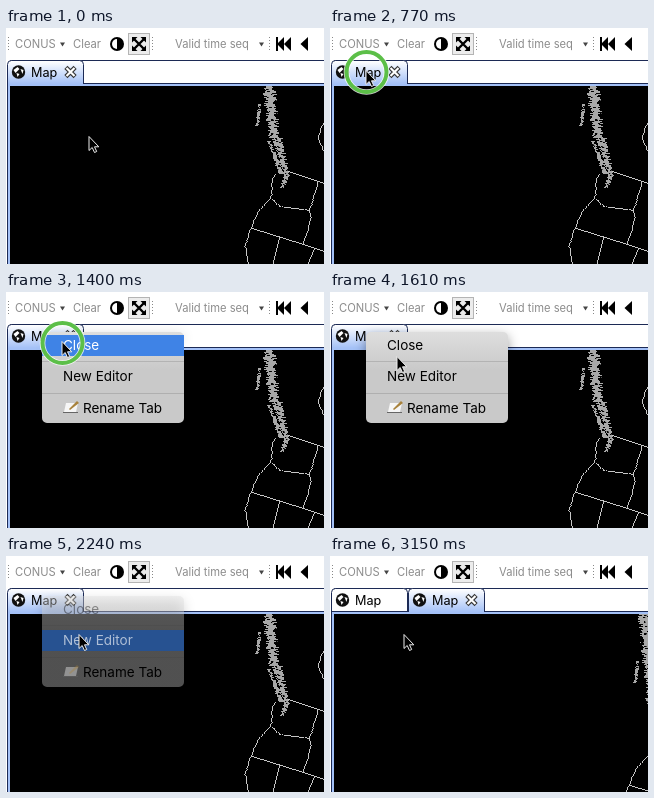
An HTML page with a canvas that plays this animation: 318 by 236 pixels, repeating every 3.22 s.

```html
<!DOCTYPE html>
<html lang="en">
<head>
<meta charset="utf-8">
<title>New editor tab</title>
<style>
html, body { margin: 0; width: 100%; height: 100%; overflow: hidden; background: #fff; }
canvas { display: block; width: 318px; height: 236px; }
</style>
</head>
<body>
<canvas id="stage" width="318" height="236"></canvas>
<script>
const LOOP = 3220, STEP = 70;
const c = document.getElementById('stage').getContext('2d');
const NAVY = '#1c2a55', BLUE = '#a4c1f7', GRAY = '#8c8c8c';

const progress = (t, from, to) => Math.min(1, Math.max(0, (t - from) / (to - from)));
const mix = (a, b, k) => a + (b - a) * k;

function random(seed) {
  return () => (seed = (seed * 16807) % 2147483647) / 2147483647;
}

function pointer(t) {
  const up = 1 - (1 - progress(t, 0, 560)) ** 1.6;
  const down = progress(t, 1190, 1750);
  const drift = 2 * progress(t, 3080, 3150) - progress(t, 2310, 2450);
  return [
    Math.round(83 - 47 * up + 37 * down ** 0.63 + drift),
    Math.round(108 - 66 * up + 36 * down ** 1.7)
  ];
}

function rect(x, y, w, h, color) {
  c.fillStyle = color;
  c.fillRect(x, y, w, h);
}

function text(s, x, y, size, color) {
  c.font = size + 'px Inter, Roboto, sans-serif';
  c.fillStyle = color;
  c.fillText(s, x, y);
}

function shape(points, color) {
  c.beginPath();
  points.forEach(([x, y]) => c.lineTo(x, y));
  c.closePath();
  c.fillStyle = color;
  c.fill();
}

function disc(x, y, r, color, from = 0, to = 7) {
  c.beginPath();
  c.arc(x, y, r, from, to);
  c.fillStyle = color;
  c.fill();
}

function cross(x, y, r, width, color) {
  c.beginPath();
  for (const s of [-1, 1]) {
    c.moveTo(x - r, y - r * s);
    c.lineTo(x + r, y + r * s);
  }
  c.strokeStyle = color;
  c.lineWidth = width;
  c.stroke();
}

const leftArrow = (x, w) => shape([[x, 16], [x + w, 9], [x + w, 23]], '#000');

// Ragged strip of islands and inlets
function fjords(rnd, [x0, y0], [x1, y1], w0, w1) {
  for (let y = y0; y < y1; y++) {
    const k = (y - y0) / (y1 - y0);
    const x = mix(x0, x1, k), w = mix(w0, w1, k);
    const a = Math.round(x - w * (0.4 + 0.8 * rnd()));
    const b = Math.round(x + w * (0.4 + 0.8 * rnd()));
    rect(a, y, Math.max(1, b - a), 1, '#a8a8a8');
    if (rnd() < 0.5) rect(Math.round(mix(a, b, rnd())), y, 1 + 2 * rnd(), 1, '#000');
  }
}

// Hard one-pixel line, optionally wobbling
function border(points, wobble = 0, rnd = Math.random) {
  let drift = 0;
  for (let i = 1; i < points.length; i++) {
    const [x0, y0] = points[i - 1], [x1, y1] = points[i];
    const n = Math.max(Math.abs(x1 - x0), Math.abs(y1 - y0));
    for (let k = 0; k < n; k++) {
      if (wobble) drift = drift * 0.8 + (rnd() - 0.5) * wobble;
      rect(Math.round(mix(x0, x1, k / n) + drift), Math.round(mix(y0, y1, k / n)), 1, 1, '#c6c6c6');
    }
  }
}

function map(states) {
  const rnd = random(41);
  fjords(rnd, [260, 22], [263, 58], 6, 6);
  fjords(rnd, [263, 58], [268, 110], 6, 5);
  fjords(rnd, [271, 110], [281, 148], 5, 3);
  fjords(rnd, [263, 113], [276, 146], 2, 3);
  fjords(rnd, [281, 146], [276, 160], 3, 2);
  fjords(rnd, [254, 76], [251, 98], 2, 2);
  if (!states) return;
  const columbia = [264, 170], snake = [303, 182], corner = [297, 216];
  border([[268, 146], columbia, [251, 184], [239, 216], [242, 237]], 1.4, rnd);
  border([[282, 143], [318, 155]]);
  border([columbia, [274, 178], snake], 1, rnd);
  border([[312, 153], snake, [306, 189], corner], 1, rnd);
  border([[246, 200], corner, [318, 223]]);
  border([[273, 209], [266, 237]]);
  border([[308, 220], [301, 237]]);
  border([[318, 91], [312, 109], [318, 124]], 1, rnd);
}

function toolbar() {
  for (const x of [2, 146, 263]) {
    for (let y = 9; y < 24; y += 3) rect(x, y, 1, 1, '#888');
  }
  text('CONUS', 9, 20, 11.2, GRAY);
  text('Clear', 67, 20, 11.2, GRAY);
  text('Valid time seq', 169, 20, 11.2, GRAY);
  for (const x of [54, 253]) shape([[x, 14.5], [x + 5, 14.5], [x + 2.5, 18.5]], '#444');

  disc(111, 16, 7, '#000');
  disc(111, 16, 5, '#fff', Math.PI / 2, Math.PI * 1.5);

  rect(122, 5, 22, 22, '#b4b4b4');
  rect(123, 6, 20, 20, '#ececec');
  cross(133, 16, 5, 2.4, '#000');
  for (const sx of [-1, 1]) for (const sy of [-1, 1]) {
    const x = 133 + sx * 7, y = 16 + sy * 7;
    shape([[x, y], [x - sx * 5.5, y], [x, y - sy * 5.5]], '#000');
  }

  rect(270, 9, 2, 14, '#000');
  leftArrow(271, 7);
  leftArrow(278, 7);
  leftArrow(294.5, 7.5);
}

function globe(x, y) {
  disc(x, y, 6.7, '#111');
  shape([[x - 5, y - 2], [x - 1, y - 5], [x + 1, y - 3], [x - 3, y + 1]], '#fff');
  shape([[x - 2, y + 1], [x + 1, y + 2], [x - 1, y + 5]], '#fff');
  shape([[x + 2, y - 3], [x + 5, y - 2], [x + 4, y + 2]], '#fff');
}

function tab(x, active) {
  c.beginPath();
  c.moveTo(x + 0.5, 56);
  c.arcTo(x + 0.5, 32.5, x + 40, 32.5, 4);
  c.arcTo(x + 76.5, 32.5, x + 76.5, 56, 4);
  c.lineTo(x + 76.5, 56);
  const g = c.createLinearGradient(0, 33, 0, 56);
  g.addColorStop(0, '#fff');
  g.addColorStop(1, active ? BLUE : '#fff');
  c.fillStyle = g;
  c.fill();
  c.strokeStyle = NAVY;
  c.lineWidth = 1;
  c.stroke();
  globe(x + 11.5, 44);
  text('Map', x + 24, 49, 12.7, '#000');
  if (active) {
    cross(x + 63.5, 44, 4.6, 4.4, '#333');
    cross(x + 63.5, 44, 4, 2.2, '#fff');
  }
}

function editor(t) {
  const opened = t >= 2450;
  rect(4, 32, 314, 1, NAVY);
  rect(1, 55, 317, 181, NAVY);
  rect(2, 56, 316, 180, BLUE);
  rect(4, 58, 314, 178, '#000');
  c.save();
  c.beginPath();
  c.rect(4, 58, 314, 178);
  c.clip();
  if (opened) c.translate(54, 29);
  if (!opened || t >= 2800) map(!opened || t >= 2870);
  c.restore();
  if (opened) {
    tab(1, false);
    rect(1, 55, 77, 1, NAVY);
    rect(2, 56, 77, 2, BLUE);
  }
  tab(opened ? 78 : 1, true);
}

function menu(t, y) {
  if (t < 910 || t >= 2310) return;
  const fade = 1 - 0.6 * progress(t, 2100, 2240);
  const rows = ['Close', 'New Editor', 'Rename Tab'];
  const top = i => 43 + i * 31.5 | 0;
  const picked = rows.findIndex((_, i) => y >= top(i) && y < top(i) + 21);

  c.save();
  c.globalAlpha = fade;
  c.shadowColor = 'rgba(0,0,0,.4)';
  c.shadowBlur = 12;
  c.shadowOffsetY = 4;
  const g = c.createLinearGradient(0, 40, 0, 78);
  g.addColorStop(0, '#dedede');
  g.addColorStop(1, '#c9c9c9');
  c.fillStyle = g;
  c.beginPath();
  c.roundRect(36, 40, 142, 91, 5);
  if (picked >= 0) c.rect(36, top(picked), 142, 21);
  c.fill('evenodd');
  c.shadowColor = 'transparent';
  for (const line of [69, 101]) rect(36, line, 142, 1, 'rgba(0,0,0,.13)');

  shape([[60, 111], [72, 111], [70, 120], [58, 120]], '#f6f6f6');
  shape([[71, 109], [73, 111], [64, 118], [63, 117]], '#a8823c');
  rect(57, 120, 15, 1, '#666');

  rows.forEach((label, i) => {
    const on = i === picked;
    c.globalAlpha = on ? Math.sqrt(fade) : i < 2 ? fade : 1;
    if (on) rect(36, top(i), 142, 21, '#3f83e6');
    text(label, i < 2 ? 57 : 77, top(i) + 15, 13.5, on ? '#fff' : '#000');
  });
  c.restore();
}

function ring(t, x, y) {
  if (t < 700 || t >= 1610) return;
  c.save();
  c.globalAlpha = 1 - progress(t, 1400, 1610);
  for (const [color, width] of [['rgba(255,255,255,.8)', 5.6], ['#5cbf48', 4]]) {
    c.beginPath();
    c.arc(x + 0.5, y + 2, 20, 0, 7);
    c.strokeStyle = color;
    c.lineWidth = width;
    c.stroke();
  }
  c.restore();
}

function arrow(x, y) {
  c.save();
  c.translate(x, y + 0.5);
  shape([[0, 0], [0, 14], [3.2, 11], [5.5, 16], [7.7, 15], [5.5, 10.3], [9.8, 10.3]], '#000');
  c.strokeStyle = '#eee';
  c.lineWidth = 1;
  c.stroke();
  c.restore();
}

function draw(now) {
  const t = Math.floor((now % LOOP) / STEP) * STEP;
  const [x, y] = pointer(t);
  rect(0, 0, 318, 236, '#fff');
  toolbar();
  editor(t);
  menu(t, y);
  ring(t, x, y);
  arrow(x, y);
}

const start = performance.now();
function tick() {
  draw(performance.now() - start);
  requestAnimationFrame(tick);
}
tick();
</script>
</body>
</html>
```
